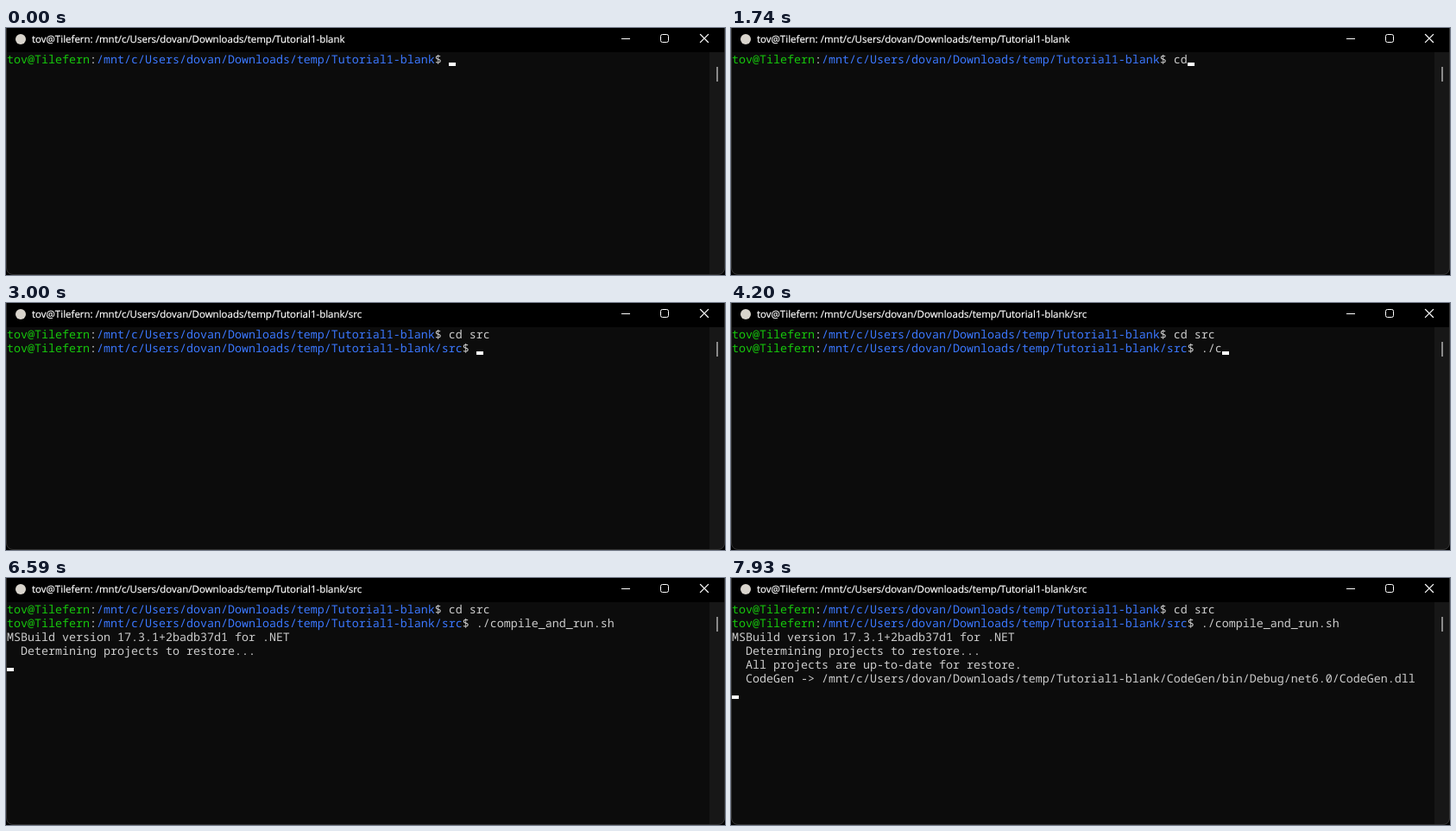
An HTML page for the animation above (8 s loop, 833x286 px).

```html
<!DOCTYPE html>
<html lang="en">
<head>
<meta charset="utf-8">
<title>Terminal</title>
<style>
  html, body { margin: 0; width: 100%; height: 100%; overflow: hidden; background: #000; }
  svg { display: block; width: 833px; height: 286px; }
  text { white-space: pre; text-rendering: geometricPrecision; }
  #title { font: 11.5px "Open Sans", sans-serif; fill: #fff; stroke: #fff; stroke-width: .2px; }
  #screen { font: 13.3333px "Noto Sans Mono", monospace; fill: #ccc; }
  .user { fill: #16c60c; }
  .path { fill: #3b78ff; }
  .buttons { fill: none; stroke: #fff; }
</style>
</head>
<body>
<svg viewBox="0 0 833 286">
  <rect y="28" width="833" height="258" fill="#0c0c0c"/>
  <rect x="815" y="28" width="18" height="258" fill="#171717"/>
  <rect x="823" y="45" width="2" height="17" fill="#8a8a8a"/>
  <path d="M0 278V286H8A8 8 0 0 1 0 278M833 278V286H825A8 8 0 0 0 833 278" fill="#000"/>
  <path d="M.5 0V278a7.5 7.5 0 0 0 7.5 7.5H825a7.5 7.5 0 0 0 7.5-7.5V0" fill="none" stroke="#333"/>
  <circle cx="17" cy="13" r="6" fill="#d8d4cc"/>
  <text id="title" x="30" y="17"></text>
  <g class="buttons">
    <path d="M713 12.5h10"/>
    <rect x="758.5" y="7.5" width="9" height="9" rx="2"/>
    <path d="M804.5 7.5l9 9m0-9l-9 9" stroke-width="1.2" stroke-linecap="square"/>
  </g>
  <g id="screen"></g>
  <rect id="cursor" width="8" height="4" fill="#fff"/>
</svg>
<script>
const LOOP = 8000, CELL = 8, ROW = 16;
const BLINK_DELAY = 630, BLINK = 530;
const user = "tov@Tilefern";
const home = "/mnt/c/Users/dovan/Downloads/temp/Tutorial1-blank";
const dirs = [home, home + "/src"];

const title = document.getElementById("title");
const screen = document.getElementById("screen");
const cursor = document.getElementById("cursor");

// Timeline: each event moves the cursor to a row and sets the text typed there.
const events = [{ time: 460 - BLINK_DELAY, row: 0, typed: "" }];

function input(time, text) {
  const { row, typed } = events.at(-1);
  events.push({ time, row, typed: typed + text });
}

function type(start, end, text) {
  const pace = (end - start) / (text.length - 1);
  [...text].forEach((char, i) => input(start + i * pace, char));
}

function newLine(time) {
  events.push({ time, row: events.at(-1).row + 1, typed: "" });
}

const output = [];
function print(time, text) {
  output.push(text);
  newLine(time);
}

type(1540, 2400, "cd src");
newLine(3000);
type(3740, 3870, "./");
input(4200, "c");
input(4530, "ompile_and_run.sh ");
newLine(5660);
print(5860, "MSBuild version 17.3.1+2badb37d1 for .NET");
print(6590, "  Determining projects to restore...");
print(6920, "  All projects are up-to-date for restore.");
print(7930, `  CodeGen -> ${home}/CodeGen/bin/Debug/net6.0/CodeGen.dll`);

function add(parent, tag, content = "", attrs = {}) {
  const node = document.createElementNS("http://www.w3.org/2000/svg", tag);
  node.textContent = content;
  for (const name in attrs) node.setAttribute(name, attrs[name]);
  return parent.appendChild(node);
}

const addLine = (row, content) =>
  add(screen, "text", content, { x: 1, y: 41 + row * ROW });

const prompts = dirs.map((dir, row) => {
  const line = addLine(row);
  add(line, "tspan", user, { class: "user" });
  add(line, "tspan", ":");
  add(line, "tspan", dir, { class: "path" });
  add(line, "tspan", "$ ");
  const command = add(line, "tspan");
  return { line, command, columns: user.length + dir.length + 3 };
});
const outputLines = output.map((text, i) => addLine(i + dirs.length, text));

const show = (node, visible) =>
  node.setAttribute("visibility", visible ? "visible" : "hidden");

function typedAt(row, time) {
  const event = events.findLast(e => e.row === row && e.time <= time);
  return event ? event.typed : "";
}

function render(time) {
  const now = events.findLast(e => e.time <= time);
  const atPrompt = now.row < prompts.length;

  title.textContent = `${user}: ${dirs[Math.min(now.row, 1)]}`;
  prompts.forEach(({ line, command }, row) => {
    show(line, row <= now.row);
    command.textContent = typedAt(row, time);
  });
  outputLines.forEach((line, i) => show(line, i + dirs.length < now.row));

  // The cursor blinks only while a prompt sits idle.
  const idle = time - now.time - BLINK_DELAY;
  const blinkedOff = atPrompt && idle >= 0 && idle % (2 * BLINK) < BLINK;
  const column = atPrompt ? prompts[now.row].columns + now.typed.length : 0;
  cursor.setAttribute("x", 1 + column * CELL);
  cursor.setAttribute("y", 40 + now.row * ROW);
  show(cursor, !blinkedOff);
}

function tick() {
  render(performance.now() % LOOP);
  requestAnimationFrame(tick);
}
tick();
</script>
</body>
</html>
```
